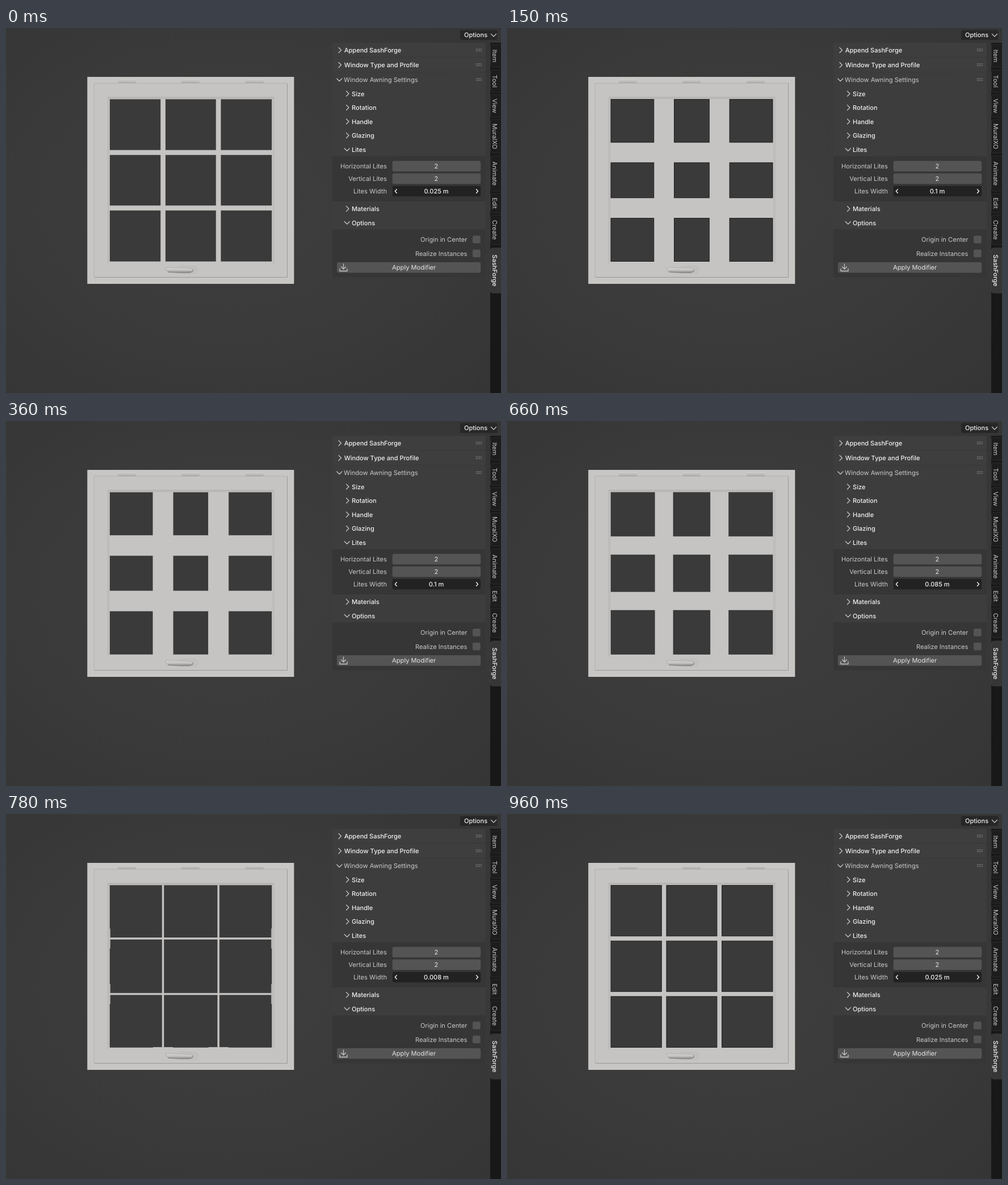
An HTML page for the animation above (1.02 s loop, 872 by 642 pixels).

```html
<!DOCTYPE html>
<html lang="en">
<head>
<meta charset="utf-8">
<title>Lites width</title>
<style>
  html, body { margin: 0; width: 100%; height: 100%; overflow: hidden; background: #393939; }
  svg { display: block; width: 872px; height: 642px; }
  text { font: 400 11.15px Inter, "Noto Sans", sans-serif; fill: #c9c9c9; text-rendering: geometricPrecision; white-space: pre; }
  .hi { fill: #f0f0f0; font-weight: 500; font-size: 11.05px; }
  .tab { font-size: 11px; }
  .line { fill: none; stroke: #c4c4c4; stroke-width: 1.3; stroke-linecap: round; stroke-linejoin: round; }
</style>
</head>
<body>
<svg id="stage" viewBox="0 0 872 642" xmlns="http://www.w3.org/2000/svg">
  <defs>
    <radialGradient id="room" cx="45%" cy="48%" r="72%">
      <stop offset="0" stop-color="#3e3e3e"/>
      <stop offset=".6" stop-color="#3a3a3a"/>
      <stop offset="1" stop-color="#353535"/>
    </radialGradient>
    <linearGradient id="grip" x2="0" y2="1">
      <stop offset="0" stop-color="#d3d2d1"/>
      <stop offset=".55" stop-color="#c3c2c1"/>
      <stop offset="1" stop-color="#898888"/>
    </linearGradient>
    <linearGradient id="hinge" x2="0" y2="1">
      <stop offset="0" stop-color="#cfcecd"/>
      <stop offset="1" stop-color="#b0afae"/>
    </linearGradient>
  </defs>
  <rect width="872" height="642" fill="url(#room)"/>
  <g id="frame"></g>
  <g id="panes"></g>
  <g id="ghosts" fill="#bdbcbb"></g>
  <g id="ui"></g>
</svg>
<script>
const NS = "http://www.w3.org/2000/svg";
const $ = id => document.getElementById(id);

function add(parent, tag, attrs, content) {
  const el = document.createElementNS(NS, tag);
  for (const k in attrs) el.setAttribute(k, attrs[k]);
  if (content) el.textContent = content;
  return parent.appendChild(el);
}
const box = (g, x, y, x2, y2, fill, more) =>
  add(g, "rect", { x, y, width: x2 - x, height: y2 - y, fill, ...more });
const path = (g, d, more) => add(g, "path", { d, class: "line", ...more });

const ui = $("ui");
const label = (s, x, mid, cls = "", anchor = "start") =>
  add(ui, "text", { x, y: mid + 4, class: cls, "text-anchor": anchor }, s);
const right = (x, y, more) => path(ui, `M${x - 2} ${y - 4.5}l4.5 4.5l-4.5 4.5`, more);
const down = (x, y, more) => path(ui, `M${x - 4.5} ${y - 2}l4.5 4.5l4.5 -4.5`, more);

function drawFrame() {
  const g = $("frame");
  box(g, 143.5, 86, 507.2, 450, "#c7c6c4");
  box(g, 143.8, 86.3, 506.9, 449.7, "none", { stroke: "#d0cfcd", "stroke-width": .6 });
  box(g, 155, 97, 495.5, 438.5, "#c5c4c2", { rx: 1, stroke: "#b1b0af" });
  path(g, "M156 438.5H495.5V98", { stroke: "#999897", style: "stroke:#999897;stroke-width:1" });
  box(g, 179.5, 121.5, 472, 414, "#c5c4c2");
  path(g, "M179.5 414V121.5H472V414", { style: "stroke:#b3b2b1;stroke-width:1" });
  box(g, 180, 122, 471.5, 125, "#b9b8b7");
  box(g, 180, 125, 182.5, 411, "#bfbebd");
  box(g, 468.5, 125, 471.5, 411, "#bfbebd");
  for (const x of [197, 309, 422]) {
    box(g, x, 90, x + 32, 96.5, "url(#hinge)", { rx: 1.5 });
    path(g, `M${x + 1} 96.5h30`, { style: "stroke:#a2a1a0;stroke-width:.8" });
  }
  box(g, 303, 418.5, 338, 432, "#c1c0bf", { rx: 6, stroke: "#b8b7b6", "stroke-width": .7 });
  path(g, "M281 422.5Q281 420.8 284 421L322 422.3Q330 422.8 330 426Q330 430.2 322 430.2L290 429.4Q281 428.5 281 422.5Z",
    { style: "fill:url(#grip);stroke:#a5a4a3;stroke-width:.7" });
  path(g, "M286 429.4Q306 431 323 430.2Q330 429.5 329.5 425", { style: "stroke:#7d7c7c;stroke-width:1" });
}

function drawPanel() {
  box(ui, 800, 3.5, 865.5, 21, "#272727", { rx: 3 });
  label("Options", 807, 12.3, "hi");
  down(859, 12.5);

  box(ui, 575, 26, 845, 51, "#3e3e3e", { rx: 3 });
  box(ui, 575, 52, 845, 77, "#3e3e3e", { rx: 3 });
  box(ui, 575, 78, 845, 438, "#3d3d3d", { rx: 3 });
  box(ui, 575, 225.5, 845, 305, "#363636");
  box(ui, 575, 354, 845, 438.5, "#363636", { rx: 3 });

  for (const y of [37, 63, 89])
    for (let i = 0; i < 8; i++)
      box(ui, 828 + i % 4 * 2.8, y + (i >> 2) * 3 - .5, 829.4 + i % 4 * 2.8, y + (i >> 2) * 3 + .9, "#909090");

  right(588, 39); label("Append SashForge", 595.7, 39, "hi");
  right(588, 65); label("Window Type and Profile", 595.7, 65, "hi");
  down(587.3, 91); label("Window Awning Settings", 595, 91);

  const subs = [["Size", 115.5], ["Rotation", 140], ["Handle", 164.5], ["Glazing", 189],
                ["Lites", 213.8, 1], ["Materials", 318], ["Options", 342.5, 1]];
  for (const [s, y, open] of subs) {
    open ? down(600.8, y) : right(601.5, y);
    label(s, 609, y, "hi");
  }

  const fields = [["Horizontal Lites", 243], ["Vertical Lites", 265], ["Lites Width", 287]];
  for (const [s, y] of fields) {
    label(s, 671, y, "", "end");
    box(ui, 680.7, y - 9.2, 836.2, y + 9.2, y === 287 ? "#222222" : "#545454", { rx: 3 });
  }
  label("2", 758, 243, "", "middle").style.fill = "#e4e4e4";
  label("2", 758, 265, "", "middle").style.fill = "#e4e4e4";
  const bright = { style: "stroke:#f0f0f0;stroke-width:1.4" };
  path(ui, "M688.3 283.8l-3 3.2l3 3.2", bright);
  path(ui, "M828.5 283.8l3 3.2l-3 3.2", bright);

  for (const [s, y] of [["Origin in Center", 372], ["Realize Instances", 396.5]]) {
    label(s, 812.5, y, "", "end");
    box(ui, 822, y - 6.7, 835.7, y + 6.7, "#545454", { rx: 2.5 });
  }
  box(ui, 583, 412, 836.2, 430.5, "#545454", { rx: 3 });
  label("Apply Modifier", 718.7, 421, "", "middle").style.fill = "#e4e4e4";
  path(ui, "M594.5 415v9m-4 -4l4 4l4 -4M588 423.5v4h13v-4");
}

function drawTabs() {
  box(ui, 853, 26, 872, 642, "#181818");
  const tabs = [["Item", 29, 69], ["Tool", 74, 113], ["View", 117, 157], ["MuralXO", 161, 220],
                ["Animate", 225, 287], ["Edit", 291, 325], ["Create", 329, 381], ["SashForge", 387, 466]];
  for (const [s, y, y2] of tabs) {
    const on = s === "SashForge";
    path(ui, `M872 ${y}H857Q853.5 ${y} 853.5 ${y + 4}V${y2 - 4}Q853.5 ${y2} 857 ${y2}H872`,
      { style: `fill:${on ? "#363636" : "#1d1d1d"};stroke:${on ? "#3c3c3c" : "#2c2c2c"};stroke-width:1` });
    add(ui, "text", { transform: `translate(857.3 ${(y + y2) / 2}) rotate(90)`, "text-anchor": "middle",
      class: on ? "tab hi" : "tab" }, s);
  }
}

drawFrame();
drawPanel();
drawTabs();
const value = label("", 758, 287, "hi", "middle");

const X = [182.5, 276.6, 374.2, 468.5], Y = [125, 219, 316.6, 411];
const panes = Array.from({ length: 9 }, () => add($("panes"), "rect", { fill: "#3a3a3a", stroke: "#101010" }));

// Leftovers of the wide bars along the rim of the opening
for (const c of [Y[1], Y[2]])
  for (const x of [X[0], X[3] - 1.3]) box($("ghosts"), x, c - 17.5, x + 1.3, c + 17.5);
for (const c of [X[1], X[2]]) box($("ghosts"), c - 17.5, Y[3] - 1, c + 17.5, Y[3]);

// time, metres, bar width in px, edge darkness, leftover strength
const LOOP = 1020;
const steps = [
  [0, .025, 8, .2, 0],
  [90, .055, 18.2, .85, 0],
  [150, .1, 34.8, .85, 0],
  [180, .1, 35.4, .65, 0],
  [210, .1, 35.4, .5, 0],
  [240, .1, 35.4, .4, 0],
  [270, .1, 35.4, .32, 0],
  [300, .1, 35.4, .26, 0],
  [330, .1, 35.4, .22, 0],
  [360, .1, 35.4, .2, 0],
  [660, .085, 31.6, .35, 0],
  [720, .045, 16, .35, .6],
  [780, .008, 3, .35, 1],
  [810, .008, 3, .35, .6],
  [870, .012, 4.3, .5, .3],
  [900, .018, 6.2, .6, .1],
  [960, .025, 7.6, .8, 0]
];

const span = (a, i, w) => [a[i] + (i ? w / 2 : 0), a[i + 1] - (i < 2 ? w / 2 : 0)];

let shown;
function show(step) {
  if (step === shown) return;
  shown = step;
  const [, metres, w, edge, ghost] = step;
  value.textContent = metres + " m";
  panes.forEach((p, i) => {
    const [x, x2] = span(X, i % 3, w), [y, y2] = span(Y, Math.floor(i / 3), w);
    p.setAttribute("x", x + .5);
    p.setAttribute("y", y + .5);
    p.setAttribute("width", x2 - x - 1);
    p.setAttribute("height", y2 - y - 1);
    p.setAttribute("stroke-opacity", edge);
  });
  $("ghosts").setAttribute("opacity", ghost);
}

const start = performance.now();
function tick(now) {
  const t = Math.max(0, now - start) % LOOP;
  show(steps.findLast(s => s[0] <= t));
  requestAnimationFrame(tick);
}
show(steps[0]);
requestAnimationFrame(tick);
</script>
</body>
</html>
```
